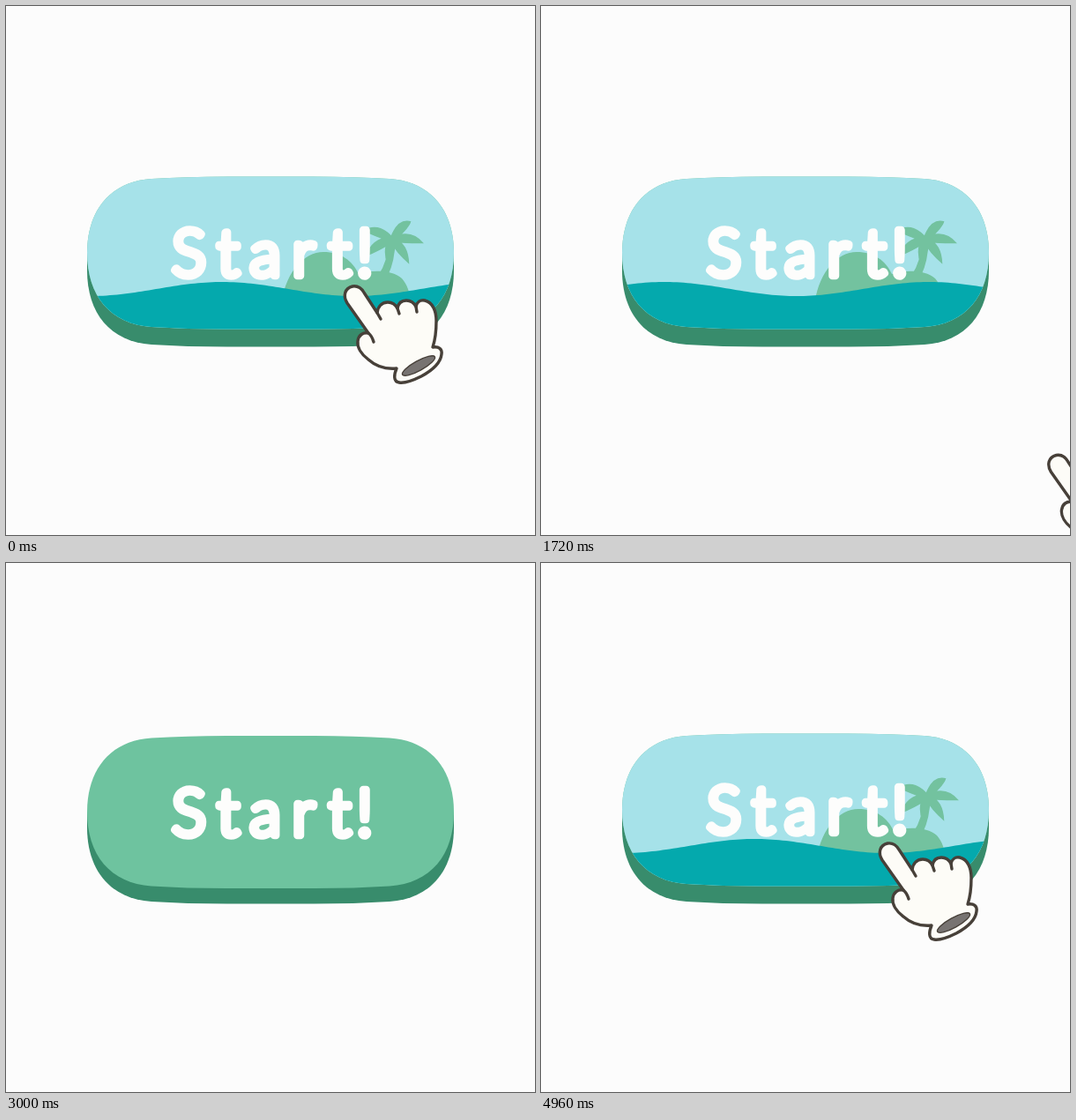
An HTML page that plays this animation: 600x600 px, repeating every 5000 ms.

```html
<!DOCTYPE html>
<html lang="en">
<head>
<meta charset="utf-8">
<title>Start button</title>
<style>
html, body { margin: 0; width: 100%; height: 100%; overflow: hidden; background: #fcfcfc; }
svg { display: block; width: 100vw; height: 100vh; }
text { font: 300 73px Lato, "Open Sans", sans-serif; fill: currentColor; stroke: currentColor; stroke-width: 8.5; stroke-linejoin: round; }
.glove { fill: #fdfcf7; stroke: #474039; stroke-width: 3.4; stroke-linecap: round; stroke-linejoin: round; }
</style>
</head>
<body>
<svg viewBox="0 0 600 600">
  <defs>
    <path id="pill" d="M92 280 C92 232 118 199 165 196 Q205 193.500 250 193.500 H350 Q395 193.500 435 196
      C482 199 508 232 508 280 C508 328 482 361 435 364 Q395 366.500 350 366.500 H250 Q205 366.500 165 364
      C118 361 92 328 92 280 Z"/>
    <clipPath id="inside"><use href="#pill"/></clipPath>
    <clipPath id="ending"><rect x="319" y="230" width="110" height="90"/></clipPath>
  </defs>

  <g fill="#388c6c">
    <use href="#pill" y="20"/>
    <rect id="side" x="92" width="416"/>
  </g>

  <g id="face">
    <use id="plain" href="#pill"/>
    <g id="scene" clip-path="url(#inside)">
      <rect x="90" y="190" width="420" height="180" fill="#a6e2e9"/>
      <g id="island" fill="#73c29f">
        <path d="M313 334 C318 302 338 279 360 279 C380 279 393 289 400 304
          C415 299 438 299 449 309 C455 316 458 325 459 334 Z"/>
        <path d="M422 306 Q434 288 434 264 H442 Q441 290 433 306 Z"/>
        <path id="leaves"/>
      </g>
      <path id="sea" fill="#04a9ad"/>
    </g>
  </g>

  <g id="words">
    <g id="shade" clip-path="url(#ending)" color="#388c6c"><use href="#label" x="-1" y="-3"/></g>
    <g color="#fdfdfc"><text id="label" x="188 239.500 276.500 324.500 366 397.500" y="306">Start!</text></g>
  </g>

  <g id="hand" class="glove">
    <path d="M411 371 L387 337 C382 329 384 320 393 318 C399 317 403 320 406 325 L421 348
      C422 340 427 336 433 336 C439 336 442 339 444 343 C445 337 449 334 454 334
      C460 334 463 337 465 341 C466 336 470 333 475 334 C484 336 488 346 488 357
      C488 368 487 378 484 387 C491 386 495 389 494 395 C493 404 484 413 471 420
      C461 425 452 428 446 427 C439 426 440 418 443 411 C432 412 421 410 411 401
      C403 395 398 387 399 380 C400 373 405 370 411 371 Z"/>
    <path fill="none" d="M411 371 Q415 374 417 381 M421 348 L425 355 M444 343 L446 349 M465 341 L466 347"/>
    <ellipse cx="468" cy="408" rx="21" ry="5.500" transform="rotate(-29 468 408)" fill="#777371" stroke-width="1.400"/>
  </g>
</svg>
<script>
const LOOP = 5000, STEP = 40;
const el = id => document.getElementById(id);
const set = (id, name, value) => el(id).setAttribute(name, value);
const shift = (id, x, y) => set(id, "transform", `translate(${x} ${y})`);

// Smooth rise from 0 to 1 between two times.
function ramp(t, from, to) {
  const p = Math.max(0, Math.min(1, (t - from) / (to - from)));
  return p * p * (3 - 2 * p);
}
const pulse = (t, a, b, c, d) => ramp(t, a, b) - ramp(t, c, d);
const mix = (a, b, p) => a + (b - a) * p;

// An arched leaf from the crown of the palm.
function leaf(angle) {
  const c = Math.cos(angle), s = Math.sin(angle);
  const len = 24 + 12 * Math.abs(c);
  const point = (along, across, drop) =>
    `${438 + len * along * c - across * s} ${265 + len * along * s + across * c + drop}`;
  return `M${point(0, -3, 0)}Q${point(0.6, -9, -5)} ${point(1, 0, 3)}Q${point(0.6, 9, -5)} ${point(0, 3, 0)}Z`;
}
set("leaves", "d", Array.from({ length: 6 }, (_, i) => leaf((i * 50 - 48) * Math.PI / 180)).join(""));

function seaPath(crest) {
  let d = "M90 370";
  for (let x = 90; x <= 510; x += 4) {
    d += `L${x} ${321 - 8 * Math.cos((x - crest) / 300 * 2 * Math.PI)}`;
  }
  return d + "L510 370Z";
}

function moveHand(t) {
  if (t < 2000) {
    const drift = -1.5 * Math.min(1, t / 900);
    const out = 193 * Math.max(0, (t - 1227) / 493) ** 3;
    shift("hand", drift + out, drift + out);
  } else {
    const left = Math.min(5, (4360 - t) / 70);
    shift("hand", 31 * Math.exp(left * 1.08), 46 * Math.exp(left * 0.91));
  }
}

function draw(t) {
  const lift = pulse(t, 2180, 2280, 2560, 2900);
  const kick = pulse(t, 2160, 2280, 2280, 2520);
  const dip = pulse(t, 2700, 3000, 3200, 3720);
  const faceY = 2.5 * dip - 4 * lift;
  shift("face", 0, faceY);
  shift("words", 0, faceY - 3.5 * kick);
  set("side", "y", 280 + faceY);
  set("side", "height", 20 - faceY);

  const grey = pulse(t, 1800, 2120, 2280, 2520);
  set("plain", "fill", `rgb(${mix(110, 150, grey)}, ${mix(195, 191, grey)}, ${mix(159, 176, grey)})`);
  set("scene", "opacity", 1 - pulse(t, 1880, 2220, 4480, 4760));
  set("shade", "opacity", pulse(t, 840, 960, 1060, 1160));

  const s = t > 3500 ? t - LOOP : t;
  shift("island", -2 * ramp(s, 0, 1720), 0);
  set("sea", "d", seaPath(mix(233, 440, ramp(s, -300, 1720))));
  moveHand(t);
}

const start = performance.now();
function tick() {
  const t = (performance.now() - start) % LOOP;
  draw(Math.floor(t / STEP) * STEP);
  requestAnimationFrame(tick);
}
tick();
</script>
</body>
</html>
```
